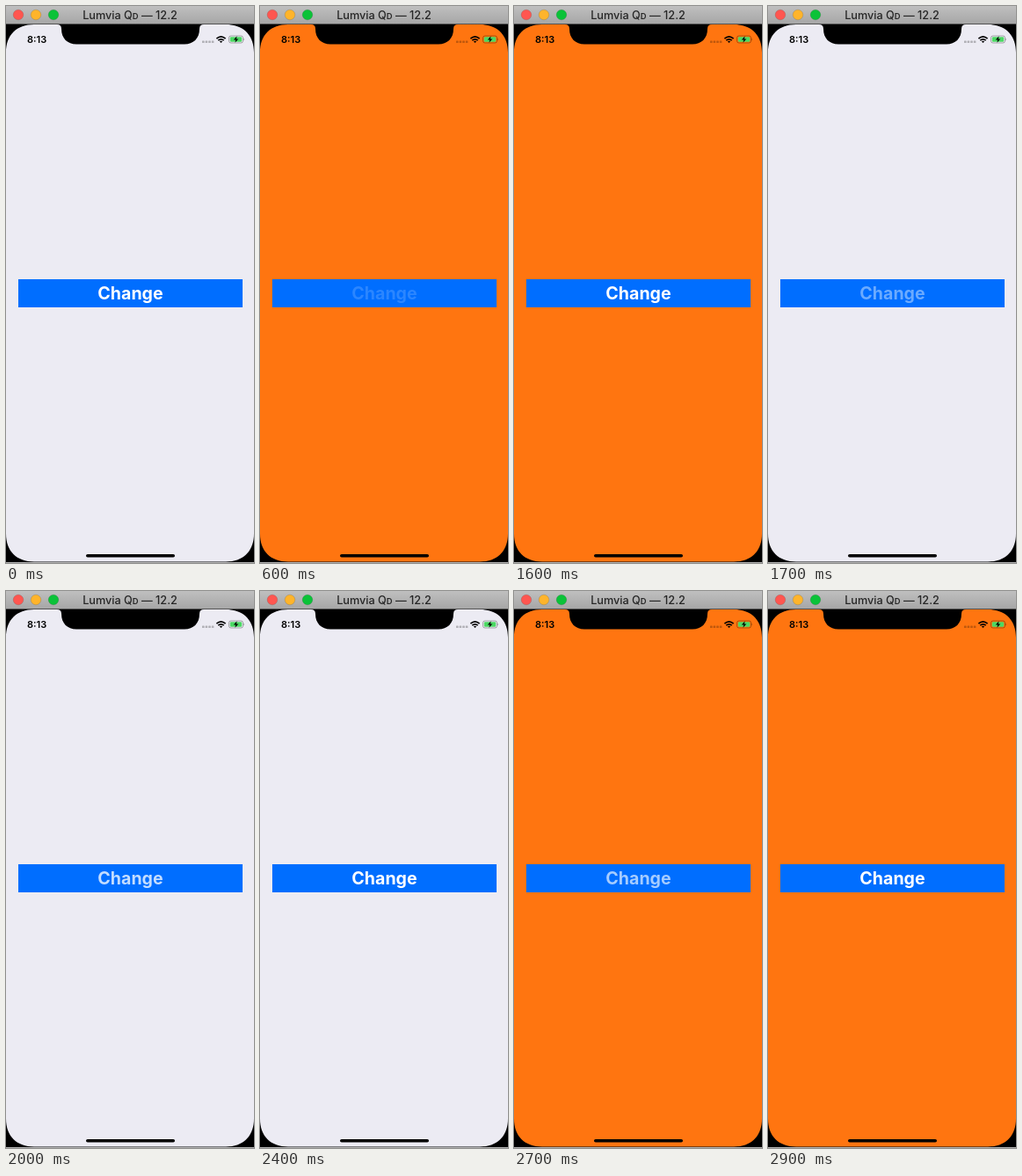
An HTML page that plays this animation: 282 px wide and 634 px high, repeating every 3 s.

```html
<!DOCTYPE html>
<html lang="en">
<head>
<meta charset="utf-8">
<title>Change</title>
<style>
  html, body { margin: 0; width: 100%; height: 100%; overflow: hidden; background: #000; }
  svg { display: block; width: 100%; height: 100%; font-family: Inter, sans-serif; }
  .screen { fill: #ecebf3; animation: swap 3s step-end infinite; }
  .label { fill: #fff; font-size: 19.6px; font-weight: 700; animation: press 3s step-end infinite; }

  /* The screen colour flips with each press. */
  @keyframes swap {
    0%, 56.66% { fill: #ecebf3; }
    19.99%, 83.33% { fill: #ff7510; }
  }

  /* The label dims on a press, then returns in 100 ms steps. */
  @keyframes press {
    0% { opacity: 1; }
    19.99% { opacity: .17; animation-timing-function: steps(7); }
    43.32% { opacity: 1; }
    56.66% { opacity: .42; animation-timing-function: steps(5); }
    73.32% { opacity: 1; }
    83.33% { opacity: .3; animation-timing-function: steps(4); }
    96.66%, 100% { opacity: 1; }
  }
</style>
</head>
<body>
<svg viewBox="0 0 282 634">
  <defs>
    <linearGradient id="bar" x2="0" y2="1">
      <stop stop-color="#bfbfbf"/>
      <stop offset="1" stop-color="#a6a6a6"/>
    </linearGradient>
  </defs>

  <!-- Window bar -->
  <rect width="282" height="634"/>
  <rect width="282" height="20.5" fill="url(#bar)"/>
  <g stroke-opacity=".2" stroke="#000" stroke-width=".6">
    <circle cx="14" cy="10" r="5.8" fill="#ff5650"/>
    <circle cx="34" cy="10" r="5.8" fill="#ffb42b"/>
    <circle cx="54" cy="10" r="5.8" fill="#0bc238"/>
  </g>
  <text x="141" y="15" text-anchor="middle" font-size="12.7" font-weight="500" fill="#262626">Lumvia Q<tspan font-size="9.4" font-weight="600">D</tspan> — 12.2</text>

  <!-- Screen and notch -->
  <rect y="633" width="282" height="1" fill="#b0b0b0"/>
  <path class="screen" d="M0 53C0 33 12 21 32 21H58Q63 21 63 26C63 37 70 43.5 80 43.5H203
    C213 43.5 220 37 220 26Q220 21 225 21H250C270 21 282 33 282 53V600.5
    C282 620.5 270 632.5 250 632.5H32C12 632.5 0 620.5 0 600.5Z"/>

  <!-- Status bar -->
  <text x="24" y="42" font-size="11" font-weight="600">8:13</text>
  <g fill-opacity=".25">
    <rect x="223" y="39.5" width="2.6" height="2.5" rx=".6"/>
    <rect x="226.6" y="39.5" width="2.6" height="2.5" rx=".6"/>
    <rect x="230.2" y="39.5" width="2.6" height="2.5" rx=".6"/>
    <rect x="233.8" y="39.5" width="2.6" height="2.5" rx=".6"/>
  </g>
  <g fill="none" stroke="#000" stroke-width="1.7">
    <path d="M239.4 37.1Q244.5 32.6 249.6 37.1"/>
    <path d="M241.3 39.2Q244.5 36.5 247.7 39.2"/>
  </g>
  <path d="M242.8 40.3Q244.5 39 246.2 40.3L244.5 42Z"/>
  <rect x="253.5" y="34" width="16" height="8" rx="2.2" fill="none" stroke="#000" stroke-opacity=".4" stroke-width=".8"/>
  <path d="M270.4 36.6Q272 38 270.4 39.4Z" fill-opacity=".4"/>
  <rect x="254.8" y="35.3" width="13.4" height="5.4" rx="1.2" fill="#4cd964"/>
  <path d="M262.6 34.3L258.8 38.6H261.2L260.4 41.8L264.3 37.4H261.9Z"/>

  <!-- Button and home indicator -->
  <rect x="14" y="311" width="255" height="32" fill="#006eff"/>
  <text class="label" x="141.5" y="334" text-anchor="middle">Change</text>
  <rect x="91" y="624" width="101" height="3.6" rx="1.8"/>
</svg>
</body>
</html>
```
